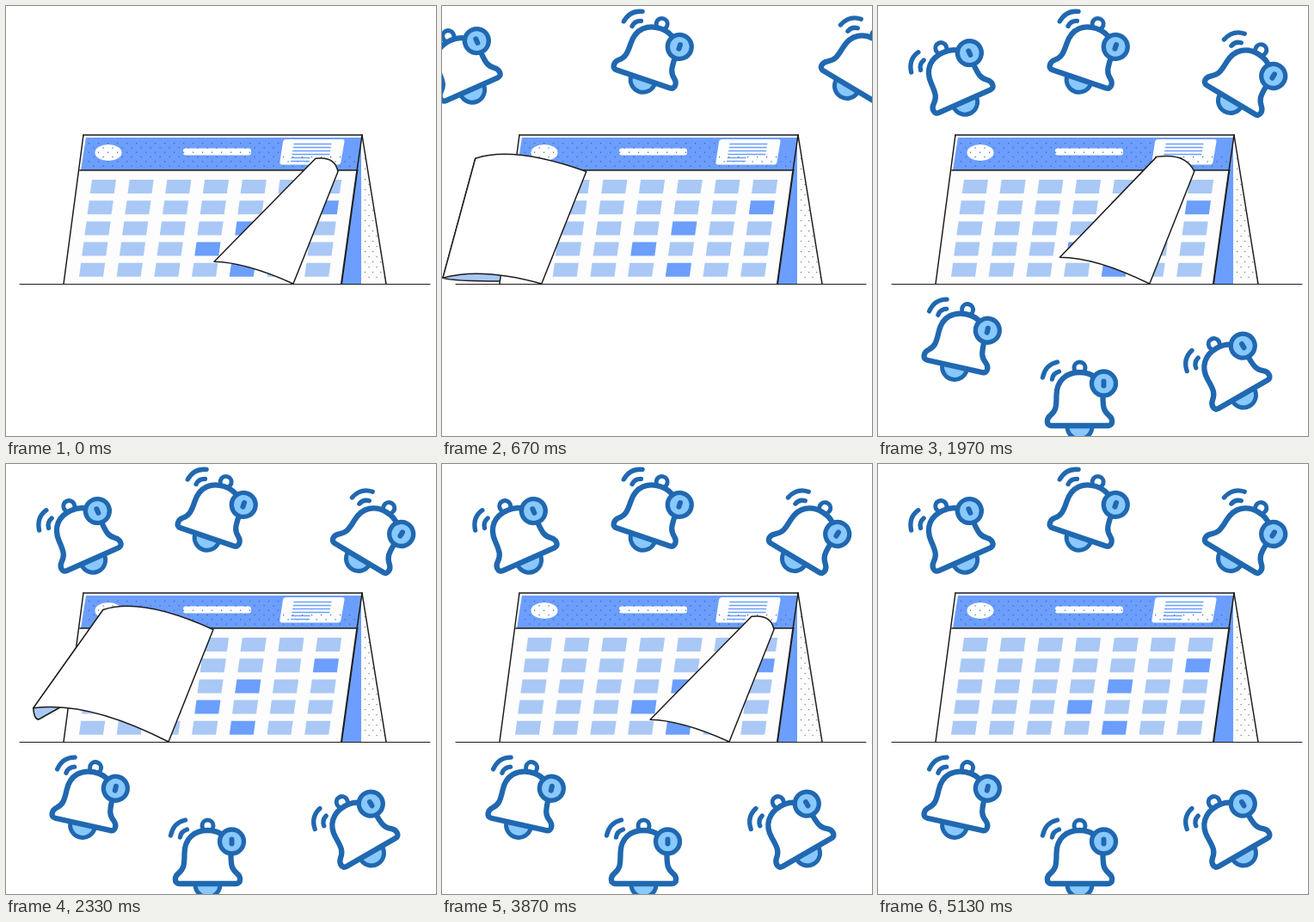
An HTML page with a canvas that plays this animation: 500x500 px, repeating every 5730 ms.

```html
<!DOCTYPE html>
<html lang="en">
<head>
<meta charset="utf-8">
<title>Calendar and bells</title>
<style>
  html, body { margin: 0; width: 100%; height: 100%; overflow: hidden; background: #fff; }
  canvas { display: block; }
</style>
</head>
<body>
<canvas id="stage" width="500" height="500"></canvas>
<script>
const ctx = document.getElementById('stage').getContext('2d');
const LOOP = 5730, FLIP_FRAMES = 48, FLIP_END = 32, TURN_END = 16, BELL_BEAT = 7;
const INK = '#1c1c1c', BLUE = '#6b9efd', PALE = '#a9c8f5', PAPER = '#fdfdfd';
const BELL_INK = '#2068b0', BELL_FILL = '#88c8fd';

// Rim centre, tilt in degrees, beat of entry, entry offset
const BELLS = [
  { x: 235, y: 82, tilt: 18.7, beat: 1, dx: 0, dy: -65 },
  { x: 99.5, y: 108, tilt: -24, beat: 2, dx: -66, dy: -14 },
  { x: 412, y: 106.5, tilt: 31, beat: 2, dx: 61, dy: -17 },
  { x: 90, y: 416, tilt: 12.6, beat: 3, dx: -65, dy: 30 },
  { x: 423, y: 449, tilt: -30, beat: 4, dx: 65, dy: 102 },
  { x: 234.5, y: 485, tilt: 0, beat: 5, dx: 0, dy: 0 }
];

const bellBody = new Path2D('M-33 3H33C39 3 39-5 34-9C28-14 27-18 27-32C27-50 15-59 0-59' +
  'C-15-59-27-50-27-32C-27-18-28-14-34-9C-39-5-39 3-33 3Z');
const bellWaves = new Path2D('M-43-53Q-40-68-26-71M-32-51Q-31-58-24-60');

const lerp = (a, b, u) => a + (b - a) * u;

function paint(path, fill, stroke, width) {
  if (fill) { ctx.fillStyle = fill; ctx.fill(path); }
  if (stroke) { ctx.strokeStyle = stroke; ctx.lineWidth = width; ctx.stroke(path); }
}

function polygon(...points) {
  return new Path2D('M' + points.join('L') + 'Z');
}

function line(x1, y1, x2, y2, width = 1.4, color = INK) {
  paint(new Path2D(`M${x1} ${y1}L${x2} ${y2}`), null, color, width);
}

function disc(x, y, rx, ry = rx) {
  const path = new Path2D();
  path.ellipse(x, y, rx, ry, 0, 0, 7);
  return path;
}

function dots(clip, x0, y0, x1, y1, stepX, stepY, color) {
  ctx.save();
  ctx.clip(clip);
  ctx.fillStyle = color;
  for (let row = 0, y = y0; y < y1; row++, y += stepY)
    for (let x = x0 + (row % 2) * stepX / 2; x < x1; x += stepX)
      ctx.fillRect(x, y, 1.2, 1.2);
  ctx.restore();
}

function drawCalendar() {
  const leg = polygon([414, 150], [442, 323], [413, 323], [413, 158]);
  paint(leg, PAPER);
  dots(leg, 417, 165, 442, 321, 9, 6, '#777');
  paint(polygon([90, 150], [414, 150], [408, 192], [390, 323], [67, 323]), PAPER);
  paint(polygon([413, 156], [408, 193], [390, 323], [413, 323]), BLUE);

  const header = polygon([93, 153], [413, 153], [408, 191], [87, 191]);
  paint(header, BLUE);
  paint(disc(119, 170.5, 15.5, 9.5), PAPER);
  const bar = new Path2D();
  bar.roundRect(206, 165.5, 79, 8, 3);
  paint(bar, PAPER);
  paint(new Path2D('M326 155H391Q394 155 393.500 158L389.500 181Q389 184.500 386 184.500' +
    'H321Q318 184.500 318.500 181L322 158Q322.500 155 326 155Z'), PAPER);
  dots(header, 96, 159, 320, 190, 11, 5.3, '#3f639f');
  dots(header, 322, 175, 408, 190, 11, 5.3, '#3f639f');
  for (let i = 0; i < 6; i++) {
    const x = 335 - i * .7, y = 160.5 + i * 4;
    line(x, y, x + (i < 4 ? 43 : 21), y, 1.3, BLUE);
  }

  const marked = ['1,6', '2,4', '3,3', '4,4'];
  for (let row = 0; row < 5; row++)
    for (let col = 0; col < 7; col++) {
      const x = 100 + col * 43.7 - row * 3.2, y = 202 + row * 24.2;
      paint(polygon([x, y], [x + 28, y], [x + 25.8, y + 16], [x - 2.2, y + 16]),
        marked.includes(row + ',' + col) ? BLUE : PALE);
    }

  line(90, 150, 414, 150, 1.5);
  line(90, 150, 67, 323, 1.5);
  line(414, 150, 442, 323, 1.5);
  line(86, 191, 409, 191, 1.7);
  line(414, 150, 408, 192, 1.6);
  line(408, 193, 390, 323, 2);
}

// The sheet turns over to the left, then is pulled in behind the calendar
function sheetPose(n) {
  const turn = Math.min(n, TURN_END);
  const left = TURN_END - turn;
  const pull = (n - turn) / (FLIP_END - TURN_END);
  const curl = Math.min(1, pull * 2);

  const rightX = 386 - n * (13.62 + .018 * (n - 17) ** 2);
  const openWidth = 129 - 103 * Math.max(0, 1 - n / 11) ** 2;
  const topLeft = {
    x: pull ? 42 - 89 * pull + 142 * pull ** 2 : rightX - openWidth,
    y: 169 + .13 * (turn - 8) ** 2 + 25 * (1 - (1 - pull) ** 3)
  };
  const topRight = { x: Math.max(rightX, topLeft.x), y: 192.5 + 8 * pull };
  const bottomLeft = {
    x: 1 + 241 * (left / TURN_END) ** 2.1 - 26 * pull + 104 * pull ** 2,
    y: 279 + .42 * (turn - 6.6) ** 2
  };
  const bottomRight = {
    x: Math.max(rightX - lerp(52, 12, curl), bottomLeft.x),
    y: 323 - 15 * curl
  };

  const bend = (topRight.x - topLeft.x) / 128;
  const topBend = { x: lerp(topLeft.x, topRight.x, 1 - .65 * bend), y: topLeft.y - 15 * bend };
  const bow = 25 * Math.sin(Math.PI * (Math.min(n, 20) + 3) / 24);
  const bottomBend = {
    x: lerp(bottomLeft.x, bottomRight.x, .4),
    y: lerp(bottomLeft.y, bottomRight.y, .4) - bow
  };

  const tuck = (left / 6) ** 2;
  const backCorner = { x: 70 - 32 * tuck, y: 320 - 23 * tuck };
  const backEnd = { x: 86, y: 205 + 65 * left / 6 };
  const backTop = { x: (topLeft.x + backEnd.x) / 2, y: backEnd.y + 3 };
  const backBend = { x: lerp(bottomLeft.x, backCorner.x, .15), y: backCorner.y };

  return {
    front: curvedQuad(topLeft, topBend, topRight, bottomRight, bottomBend, bottomLeft),
    back: curvedQuad(bottomLeft, backBend, backCorner, backEnd, backTop, topLeft)
  };
}

function curvedQuad(a, bend1, b, c, bend2, d) {
  const path = new Path2D();
  path.moveTo(a.x, a.y);
  path.quadraticCurveTo(bend1.x, bend1.y, b.x, b.y);
  path.lineTo(c.x, c.y);
  path.quadraticCurveTo(bend2.x, bend2.y, d.x, d.y);
  path.closePath();
  return path;
}

function drawBell({ x, y, tilt, beat, dx, dy }, frame) {
  const age = frame - (2 + beat * BELL_BEAT);
  if (age < 0) return;
  const away = age === 0 ? 1 : 0;
  ctx.save();
  ctx.translate(x + dx * away, y + dy * away);
  ctx.rotate(tilt * Math.PI / 180);
  paint(disc(0, 4, 14.5), BELL_FILL, BELL_INK, 5);
  paint(disc(0, -64.5, 6.5), '#fff', BELL_INK, 5);
  paint(bellBody, '#fff', BELL_INK, 6.3);
  paint(disc(28, -46, 14), BELL_FILL, BELL_INK, 5.3);
  line(28, -48.5, 28, -43.5, 6, BELL_INK);
  paint(bellWaves, null, BELL_INK, 5.3);
  ctx.restore();
}

function draw(ms) {
  // 25 steps a second shown at 30 ticks: every sixth tick repeats
  const tick = Math.floor((ms % LOOP + 4) * .03);
  const frame = 5 * Math.floor(tick / 6) + Math.max(0, tick % 6 - 1);
  const n = frame % FLIP_FRAMES;
  const sheet = n < FLIP_END ? sheetPose(n) : null;
  const behind = n >= 24;

  ctx.fillStyle = '#fff';
  ctx.fillRect(0, 0, 500, 500);
  ctx.lineJoin = ctx.lineCap = 'round';
  if (sheet && n >= 10) paint(sheet.back, PALE, INK, 1.5);
  if (sheet && behind) paint(sheet.front, '#fff', INK, 1.5);
  drawCalendar();
  line(16, 323.5, 493, 323.5, 1);
  if (sheet && !behind) paint(sheet.front, '#fff', INK, 1.5);
  for (const bell of BELLS) drawBell(bell, frame);
}

const began = performance.now();
function loop() {
  draw(performance.now() - began);
  requestAnimationFrame(loop);
}
loop();
</script>
</body>
</html>
```
